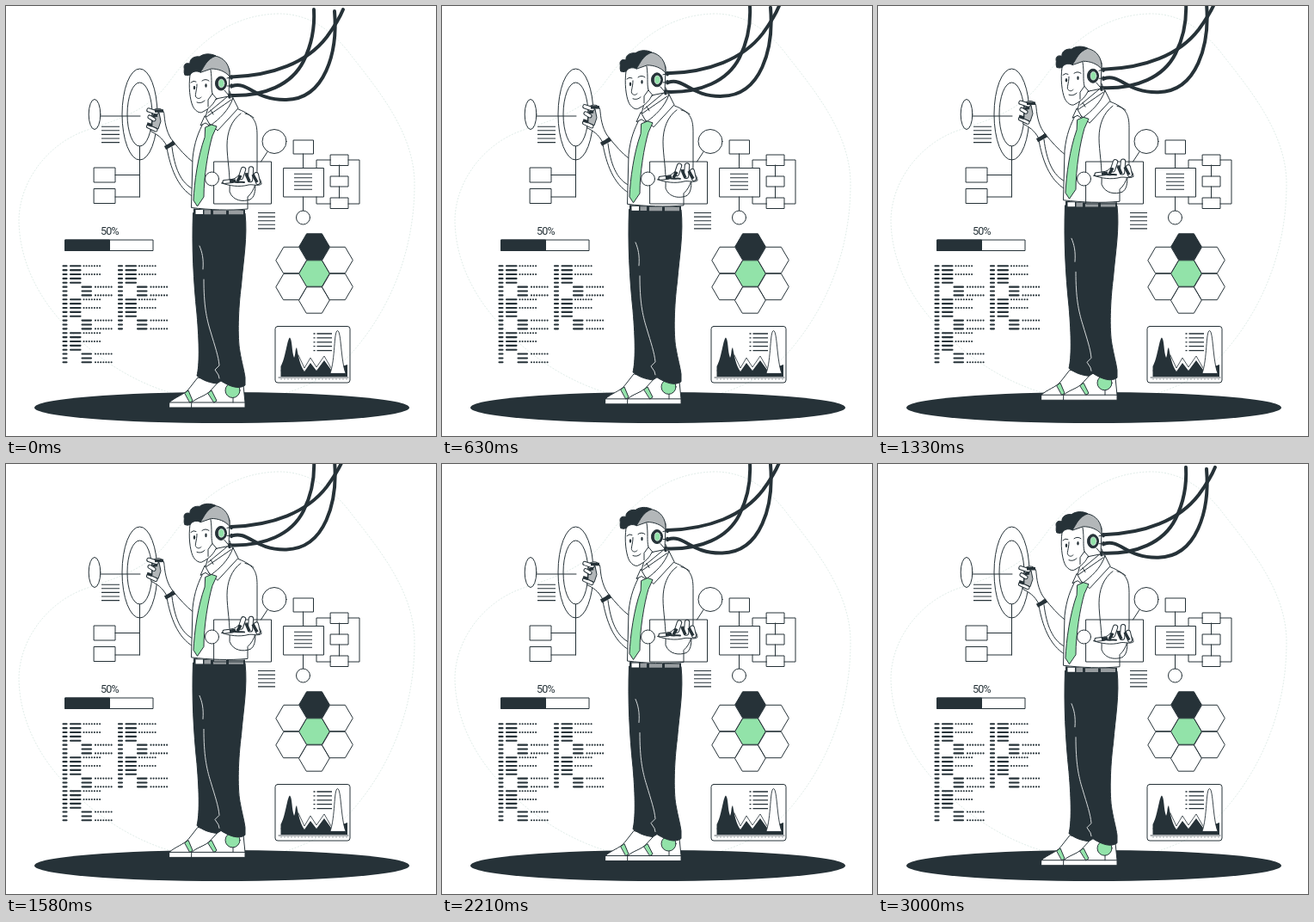
Write an HTML page that moves like this. It is 500 px wide and 500 px high and loops after 3.04 s.

```html
<!DOCTYPE html>
<html lang="en">
<head>
<meta charset="utf-8">
<title>Android at work</title>
<style>
html, body { margin: 0; width: 100%; height: 100%; overflow: hidden; background: #fff; }
svg { display: block; width: 100vw; height: 100vh; }
.ink { fill: none; stroke: #263238; stroke-width: 1; stroke-linecap: round; stroke-linejoin: round; }
.white { fill: #fff; }
.dark { fill: #263238; }
.green { fill: #92e3a9; }
.gray { fill: #b3b7b9; }
.bare { stroke: none; }
.cable { stroke-width: 4; }
text { font: 12.5px Roboto, "Liberation Sans", sans-serif; letter-spacing: -.8px; fill: #263238; stroke: none; }
</style>
</head>
<body>
<svg viewBox="0 0 500 500">
  <path d="M315 9C358 8 385 36 401 57C433 98 475 148 475 207C475 286 446 352 405 400C370 441 310 462 251 460C180 457 118 422 75 378C38 342 15 296 15 248C16 205 47 160 95 144C140 129 167 119 190 88C219 48 256 11 315 9Z"
    fill="none" stroke="#d8e8e2" stroke-width=".8" stroke-dasharray="2 1.6"/>
  <ellipse cx="251" cy="467" rx="218" ry="18" fill="#263238"/>

  <g class="ink" id="panels">
    <ellipse cx="155.5" cy="126" rx="20.5" ry="53"/>
    <ellipse cx="155.5" cy="126" rx="14.5" ry="37"/>
    <ellipse cx="103" cy="126" rx="6.8" ry="17.5"/>
    <path d="M110 128H156M155.5 163V222M127 196.5H155.5M127 222H155.5"/>
    <rect x="102.5" y="188" width="24.5" height="17"/>
    <rect x="102.5" y="212.5" width="24.5" height="17"/>

    <text x="120.500" y="266" text-anchor="middle">50%</text>
    <rect x="69" y="272" width="102" height="12.500"/>
    <rect class="dark" x="69" y="272" width="51.500" height="12.500"/>

    <rect x="334.5" y="156" width="23" height="16"/>
    <rect x="323" y="188.5" width="46.5" height="33.500"/>
    <circle cx="345.5" cy="246" r="8"/>
    <path d="M345.5 172V188.5M345.5 222V238M377.5 179H361V188.5M361 222V230H377.5M398 179H411V230H398M387.5 185V198M387.5 210V223"/>
    <rect x="377.5" y="173" width="20.5" height="12.5"/>
    <rect x="377.5" y="198" width="20.5" height="12"/>
    <rect x="377.5" y="223" width="20.5" height="12.5"/>

    <rect x="313" y="372.5" width="87" height="65.5" rx="3"/>
    <path stroke-width=".8" d="M320 424L326 412M340 406L347 421L354 409L361 420L370 407L378 421"/>
    <path class="dark bare" d="M319.5 431V419C325 410 327 387 330 385.500C333 388 332 402 335 409C337 405 336 399 338 397C340 408 342 418 347 425L354 415L361 424L370 412L378 423L397 417V431Z"/>
    <path class="white" stroke-width=".9" d="M377 427C383 411 381 378 385.500 377.500C390 378 389 412 395 427Z"/>
    <path stroke-width=".8" d="M317 432H398"/>
    <path stroke-dasharray="0 4" d="M320 434H398"/>
  </g>

  <g class="ink float">
    <g class="cable">
      <path d="M262 82.500C310 81 350 66 373 36C381 25 388 14 392 4"/>
      <path d="M262 104C300 105 332 92 346 64C356 44 359 22 358 4"/>
      <path d="M263 93C282 87 289 110 326 109C371 108 386 54 382 6"/>
    </g>

    <!-- far arm and hand -->
    <path class="white" d="M194 157C202 167 209 175 218 182V222C199 211 191 187 187 165Z"/>
    <path d="M193 164C196 188 203 206 218 213"/>
    <path class="white" d="M171 121C178 117 184 120 184 127C185 139 188 150 194 157L187 163C182 153 175 149 169 146Z"/>
    <path class="gray" d="M171 128L178 124L180 134L177 143L170 140Z"/>
    <g id="farFingers"></g>
    <path stroke-width="4.500" stroke-linecap="butt" d="M185 165L196 159"/>

    <!-- shoes -->
    <path class="white" d="M190 461C196 455 207 452 212 446L223 432L248 437L238 461V467H190Z"/>
    <path class="green" d="M208 450L212 447L217 459L214 461Z"/>
    <path d="M190 461H238"/>
    <path class="white" d="M216 461C222 455 232 454 238 447L249 435L276 441L278 461V467H216Z"/>
    <path class="green" d="M235 450L239 447L245 459L242 461Z"/>
    <path d="M216 461H278"/>
    <circle class="green" cx="263.500" cy="447" r="8.500"/>
    <path d="M264 455.500V461"/>

    <!-- trousers -->
    <path class="dark" d="M217.500 241H278C281 268 276 295 273.500 325C270 352 269 385 272 402C274 414 277 424 278 432V441C271 446 261 443 250 436L245 439C237 438 230 436 222 430C225 417 225 394 222 358C218 320 216 280 217.500 241Z"/>
    <path stroke="#d5d9da" d="M225 279C228 286 230 294 229 306M230 318C230 348 233 363 238 379C243 396 247 407 248 418L243 423L247 429L248 433"/>

    <!-- shirt -->
    <path class="white" d="M230 135C224 146 219 158 217 177L215.500 234.500C237 237 260 238 281 236V222C290 214 292 202 292 187V150C292 134 288 127 270 120L260 112Z"/>
    <path d="M273 125C262 133 257 147 257 162C257 178 261 195 260 216C264 227 276 228 284 225C289 222 290 216 290 206M278 125C282 126 286 128 288 130"/>
    <path class="dark bare" d="M218 235.500Q249 238.500 278 237V243H218Z"/>
    <path class="white bare" d="M220.500 237H229V242H220.500Z"/>
    <path fill="#989da0" class="bare" d="M230.500 237.300H238V242.200H230.500ZM241 237.700H256V242.300H241ZM259 238H276V242.300H259Z"/>

    <!-- neck, collar, tie -->
    <path class="white" d="M236 114L231 133L241 140L268 119L260 99Z"/>
    <path d="M235 124L258 105M233 129L262 109M238 121L241 126"/>
    <path class="white" d="M231 128L226 139L232 136L238 140Z"/>
    <path class="white" d="M264 107L270 119L246 145L239 138C247 132 259 122 264 107Z"/>
    <path class="green" d="M232 141L239 138L245 140L240 151C235 168 230 198 230 222L222.500 233L218 226C219 205 223 175 231 153Z"/>

    <!-- head -->
    <path class="white" d="M214 80C212 94 214 109 217 116C219 121 225 126 229 123C237 119 242 113 244 108L259 105L260 75C253 56 222 57 214 80Z"/>
    <path class="gray" d="M226 77C228 66 235 57 243 58C254 60 261 69 260 82C255 76 247 73 239 73Z"/>
    <path class="dark" d="M208 80C206 77 208 74 207 71C207 67 210 66 214 67C213 61 220 58 225 59C230 55 238 55 244 58C233 62 231 70 226 77C221 75 217 76 214 80C212 81 210 81 208 80Z"/>
    <path d="M238 74C240 87 238 94 240 102L245 108M222 91C222 99 219 104 221 106C223 108 225 108 227 106M222 112Q227 114 231 110M215 89Q218 86 221 88M228 87Q232 84 236 87M240 102L235 109V117"/>
    <ellipse class="dark bare" cx="219" cy="95" rx="1.200" ry="2.300"/>
    <ellipse class="dark bare" cx="232.500" cy="92.500" rx="1.200" ry="2.300"/>
    <ellipse class="dark" cx="250" cy="90" rx="6.500" ry="8"/>
    <ellipse cx="250.500" cy="90" rx="3.300" ry="4.800" fill="#92e3a9" stroke="#dfe8e5" stroke-width=".8"/>
    <path stroke-width="3.500" d="M262 82V84M262 92V94M260 103V106"/>
    <path d="M257 84L261 83M257 93H261M254 98L259 104"/>
  </g>

  <g class="ink">
    <path d="M242 181H308.500V230H242ZM296.500 181L304 169.500"/>
    <circle class="white" cx="312" cy="157.500" r="14"/>
    <circle class="white" cx="239.500" cy="201" r="8"/>
  </g>

  <g class="ink float">
    <path class="white" d="M251 206C252 202 261 203 267 200C272 195 277 194 284 195C291 196 297 201 297 207C293 210 287 207 282 208C271 211 260 209 251 206Z"/>
    <g id="nearFingers"></g>
    <path stroke-width="2" d="M264 204C269 206 273 204 277 205"/>
  </g>
</svg>
<script>
const NS = "http://www.w3.org/2000/svg";
const $ = id => document.getElementById(id);

function add(parent, d, attrs = {}) {
  const el = document.createElementNS(NS, "path");
  el.setAttribute("d", d);
  for (const k in attrs) el.setAttribute(k, attrs[k]);
  parent.append(el);
}

function textLines(x1, x2, y, gap, width = 1.1) {
  let d = "";
  for (let i = 0; i < 5; i++) d += `M${x1} ${y + i * gap}H${x2}`;
  add($("panels"), d, { "stroke-width": width, "stroke-linecap": "butt" });
}
textLines(111, 132, 140.2, 4.6);
textLines(293, 313, 240.5, 4.6);
textLines(335, 356, 195.3, 4.5);
textLines(361.5, 379, 381, 4.9, 1.3);
textLines(357.5, 359.5, 381, 4.9, 1.3);

// Two listings built from the same eight-row block
function listing(x, blocks) {
  let dashes = "", dots = "";
  for (let i = 0; i < blocks * 8; i++) {
    const row = i % 8, y = 302.3 + i * 4.87;
    const indent = row > 4 ? 13.5 : 0;
    dashes += `M${x + 1.5} ${y}h4M${x + 10 + indent} ${y}h${indent ? 10.5 : 11.5}`;
    if ([0, 2, 5, 7].includes(row)) dots += `M${x + 25.5 + indent} ${y}h18.8`;
  }
  add($("panels"), dashes, { "stroke-width": 2.1 });
  add($("panels"), dots, { "stroke-width": 2.1, "stroke-dasharray": "0 3.1" });
}
listing(65, 3);
listing(129.5, 2);

function hex(x, y, cls) {
  const r = 17.8, h = 15.2;
  add($("panels"), `M${x - r} ${y}l${r / 2} ${-h}h${r}l${r / 2} ${h}l${-r / 2} ${h}h${-r}Z`, { class: cls });
}
hex(358.5, 280, "dark");
hex(358.5, 311, "green");
hex(358.5, 342, "white");
for (const x of [331.8, 385.5]) for (const y of [295.5, 326.5]) hex(x, y, "white");

// Outlined white finger with a dark joint
function finger(parent, width, tip, joint) {
  add(parent, tip, { "stroke-width": width });
  add(parent, tip, { "stroke-width": width - 2, stroke: "#fff" });
  add(parent, joint, { "stroke-width": 3.5, "stroke-linecap": "butt" });
}
const far = $("farFingers"), near = $("nearFingers");
finger(far, 5.4, "M166 121L175 124", "M173 122L183 122");
finger(far, 5, "M167 129L172 132", "M171 128L176 127");
finger(far, 5, "M165.500 140L174 144", "M164 137L170 139");
finger(near, 6.4, "M273 199L276 190", "M269 204L273 197");
finger(near, 6.4, "M284 202L285 189.500", "M279 195L283 204");
finger(near, 6, "M293 205L291 196", "M287 196L292 205");
finger(near, 5, "M254 204.500L263 203.500", "M260 204L267 203");

const LOOP = 3040, RISE = 10;
const floats = document.querySelectorAll(".float");
const start = performance.now();
function draw(now) {
  const p = Math.max(0, now - start) % LOOP / LOOP;
  const y = -RISE * (1 - Math.abs(1 - 2 * p));
  for (const g of floats) g.setAttribute("transform", `translate(0 ${y})`);
  requestAnimationFrame(draw);
}
draw(start);
</script>
</body>
</html>
```
